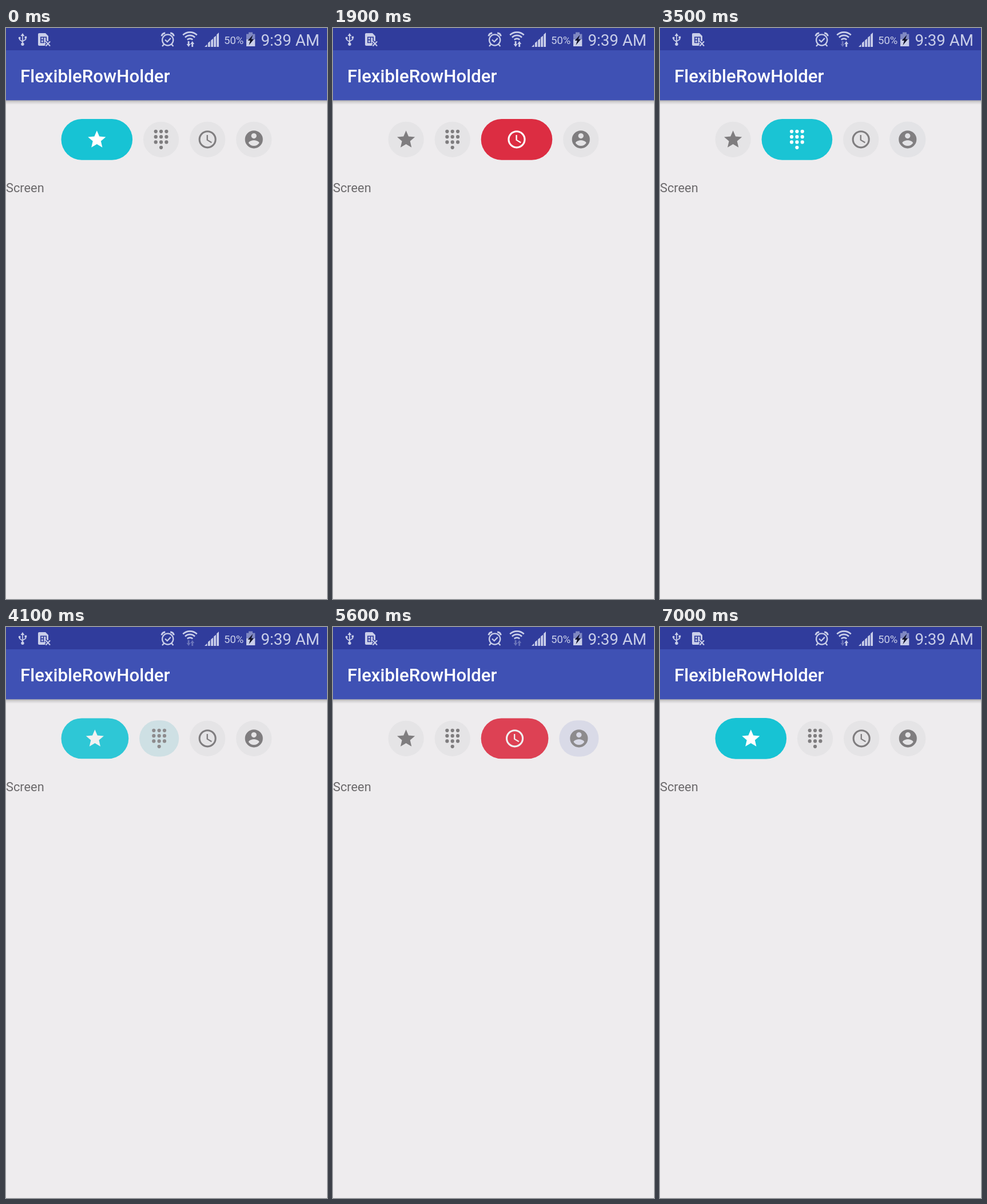
Animation of 561x998 px, one loop 7100 ms. Source, as an HTML page:

```html
<!DOCTYPE html>
<html lang="en">
<head>
<meta charset="utf-8">
<title>Resizing tabs</title>
<style>
  html, body { margin: 0; width: 100%; height: 100%; overflow: hidden; background: #eeecee; }
  svg { display: block; width: 100%; height: 100%; }
  text { font-family: Roboto, sans-serif; }
</style>
</head>
<body>
<svg viewBox="0 0 561 998" preserveAspectRatio="none">
  <defs>
    <linearGradient id="shade" x2="0" y2="1">
      <stop offset="0" stop-color="#000" stop-opacity=".28"/>
      <stop offset=".4" stop-color="#000" stop-opacity=".12"/>
      <stop offset="1" stop-color="#000" stop-opacity="0"/>
    </linearGradient>
  </defs>
  <rect width="561" height="998" fill="#eeecee"/>
  <rect y="126" width="561" height="8" fill="url(#shade)"/>
  <rect y="39" width="561" height="87.3" fill="#3f51b4"/>
  <rect width="561" height="39" fill="#303c9c"/>
  <text x="25" y="94.5" font-size="31.2" font-weight="500" fill="#fff">FlexibleRowHolder</text>

  <g id="status" fill="#c9cee9">
    <!-- usb -->
    <path d="M29 9l3.4 5h-6.8z"/>
    <circle cx="29" cy="28.3" r="2.7"/>
    <circle cx="23.7" cy="17.5" r="1.9"/>
    <rect x="32.6" y="14.6" width="3.6" height="3.6"/>
    <path d="M29 13V28M23.7 18v2.2L29 24.2M34.4 17v3L29 23.2" fill="none" stroke="#c9cee9" stroke-width="1.7"/>
    <!-- card -->
    <path d="M58 9h11l5 5v9l-5 3 3 5H58q-2 0-2-2V11q0-2 2-2z"/>
    <path d="M60 16h11M60 25.5h7M61 16v10M65.5 16v10M60 20.7h5M70.3 16v7" fill="none" stroke="#303c9c" stroke-width="1.7"/>
    <path d="M69.5 23.5l7.6 8M77.1 23.5l-7.6 8" fill="none" stroke="#303c9c" stroke-width="5"/>
    <path d="M69.5 23.5l7.6 8M77.1 23.5l-7.6 8" fill="none" stroke="#c9cee9" stroke-width="2"/>
    <!-- alarm -->
    <g fill="none" stroke="#c9cee9" stroke-width="2.3">
      <circle cx="282.7" cy="21" r="9.6"/>
      <path d="M278 20.5l3.8 3.7 6-6.3M276 28.5l-3 3.5M289.4 28.5l3 3.5"/>
      <path d="M272 14.3q1-5 6.2-5.5M293.4 14.3q-1-5-6.2-5.5" stroke-width="3"/>
    </g>
    <!-- wifi -->
    <path d="M309.3 12.3a17.5 17.5 0 0 1 24.4 0M313 16.5a12 12 0 0 1 17 0M316.8 20.4a7 7 0 0 1 9.4 0"
      fill="none" stroke="#c9cee9" stroke-width="2.7"/>
    <path id="down" d="M317.7 23h2.8v5h2.1l-3.500 5-3.500-5h2.100z"/>
    <path id="up" d="M324.300 33h2.800v-5h2.100l-3.500-5-3.500 5h2.100z"/>
    <!-- signal -->
    <path d="M347 33l4.5-4.5V33zM353 33v-7l3.8-3v10zM358.2 33V21.5l3.8-3V33zM363.2 33V16.5l3.8-3V33zM368.2 33V11.5l3.8-3.5V33z"/>
    <!-- battery -->
    <path d="M424 7.5h7v3h4.3V21H420V10.5h4z" fill="#7f88c2"/>
    <rect x="420" y="20" width="15.3" height="12"/>
    <path d="M431.5 12l-9 10h4.3l-2.3 8 8.8-10.5h-4.5z" fill="#12142c"/>
    <text x="381" y="27.5" font-size="18.5">50%</text>
    <text x="445.5" y="31" font-size="27.7">9:39 AM</text>
  </g>

  <g id="pages" font-size="21.8" fill="#6b696b"></g>
  <g id="tabs"></g>
  <circle id="touch" r="17.3" fill="#fff" fill-opacity=".62" stroke="#6f80cc" stroke-opacity=".65" stroke-width="2"/>
</svg>
<script>
const LOOP = 7100, STEP = 100, WIDTH = 561;
const LEFT = 96.5, SMALL = 62.3, GAP = 18.8, MID = 194.8, DP = 1.558;
const IDLE = [229, 228, 230], IDLE_ICON = [127, 125, 127], WHITE = [255, 255, 255];
const CYAN = [23, 195, 212];
const COLORS = [CYAN, CYAN, [220, 45, 66], [120, 139, 240]];

const dot = (x, y) => `M${x - 2} ${y}a2 2 0 1 0 4 0a2 2 0 1 0-4 0z`;
const dialpad = [3, 9, 15].map(y => [6, 12, 18].map(x => dot(x, y)).join('')).join('') + dot(12, 21);
const ICONS = [
  'M12 17.27L18.18 21l-1.64-7.03L22 9.24l-7.19-.61L12 2 9.19 8.63 2 9.24l5.46 4.73L5.82 21z',
  dialpad,
  'M12 2a10 10 0 1 0 0 20a10 10 0 1 0 0-20zM12 4a8 8 0 1 1 0 16a8 8 0 1 1 0-16z' +
    'M12.5 7H11v6l5.25 3.15.75-1.23-4.5-2.67z',
  'M12 2a10 10 0 1 0 0 20a10 10 0 1 0 0-20zM12 5a3 3 0 1 1 0 6a3 3 0 1 1 0-6z' +
    'M12 19.2c-2.5 0-4.71-1.28-6-3.22.03-1.99 4-3.08 6-3.08 1.99 0 5.97 1.09 6 3.08-1.29 1.94-3.5 3.22-6 3.22z'
];

// Each tap: finger down, selection start, target tab, finger position
const TAPS = [
  { down: 500, start: 640, to: 1, x: 275, y: 207 },
  { down: 1300, start: 1530, to: 2, x: 360, y: 210 },
  { down: 2100, start: 2243, to: 3, x: 437, y: 208 },
  { down: 3100, start: 3316, to: 1, x: 214, y: 207 },
  { down: 3800, start: 3943, to: 0, x: 131, y: 207 },
  { down: 4600, start: 4685, to: 3, x: 407, y: 205 },
  { down: 5400, start: 5443, to: 2, x: 297, y: 207 },
  { down: 6100, start: 6143, to: 1, x: 212, y: 207 },
  { down: 6600, start: 6743, to: 0, x: 132, y: 207 }
];

const byId = id => document.getElementById(id);
const clamp = v => Math.min(1, Math.max(0, v));
const mix = (a, b, p) => `rgb(${a.map((v, i) => Math.round(v + (b[i] - v) * p))})`;

function set(el, attrs) {
  for (const key in attrs) el.setAttribute(key, attrs[key]);
}

function add(parent, tag, attrs = {}) {
  const el = document.createElementNS('http://www.w3.org/2000/svg', tag);
  set(el, attrs);
  return parent.appendChild(el);
}

const tabs = ICONS.map(d => ({
  pill: add(byId('tabs'), 'rect'),
  icon: add(byId('tabs'), 'path', { d, 'fill-rule': 'evenodd' })
}));
const pages = ICONS.map(() => {
  const label = add(byId('pages'), 'text', { y: 287 });
  label.textContent = 'Screen';
  return label;
});

function drawTabs(weights) {
  let x = LEFT;
  tabs.forEach(({ pill, icon }, i) => {
    const p = weights[i], width = SMALL * (1 + p), height = SMALL + 9.5 * p;
    set(pill, { x, y: MID - height / 2, width, height, rx: height / 2, fill: mix(IDLE, COLORS[i], p) });
    set(icon, {
      transform: `translate(${x + width / 2} ${MID}) scale(${DP}) translate(-12 -12)`,
      fill: mix(IDLE_ICON, WHITE, p)
    });
    x += width + GAP;
  });
}

function drawPages(from, to, age) {
  const span = Math.abs(to - from), duration = (span + 1) * 100;
  const rest = (1 - clamp(age / duration)) ** 5;
  const scroll = span * rest < .02 ? to : to + (from - to) * rest;
  pages.forEach((label, i) => set(label, { x: (i - scroll) * WIDTH }));
}

function drawTouch(t) {
  const tap = TAPS.filter(e => e.down <= t).pop();
  const opacity = tap ? clamp(1 - Math.max(0, t - tap.start) / 155) : 0;
  set(byId('touch'), { opacity, cx: tap ? tap.x : 0, cy: tap ? tap.y : 0 });
}

function drawArrows(t) {
  const upOn = t < 3800 || t >= 6600;
  set(byId('down'), { opacity: t < 2100 ? 1 : .38 });
  set(byId('up'), { opacity: upOn ? 1 : .38 });
}

function draw(t) {
  const index = TAPS.filter(e => e.start <= t).length - 1;
  const tap = TAPS[index] || { start: -LOOP, to: 0 };
  const from = index > 0 ? TAPS[index - 1].to : 0;
  const age = t - tap.start;
  const p = (1 - Math.cos(Math.PI * clamp(age / 200))) / 2;
  const weights = [0, 0, 0, 0];
  weights[from] = 1 - p;
  weights[tap.to] = from === tap.to ? 1 : p;
  drawTabs(weights);
  drawPages(from, tap.to, age);
  drawTouch(t);
  drawArrows(t);
}

// The picture advances ten times a second
function tick() {
  draw(Math.floor(performance.now() % LOOP / STEP) * STEP);
  requestAnimationFrame(tick);
}
tick();
</script>
</body>
</html>
```
